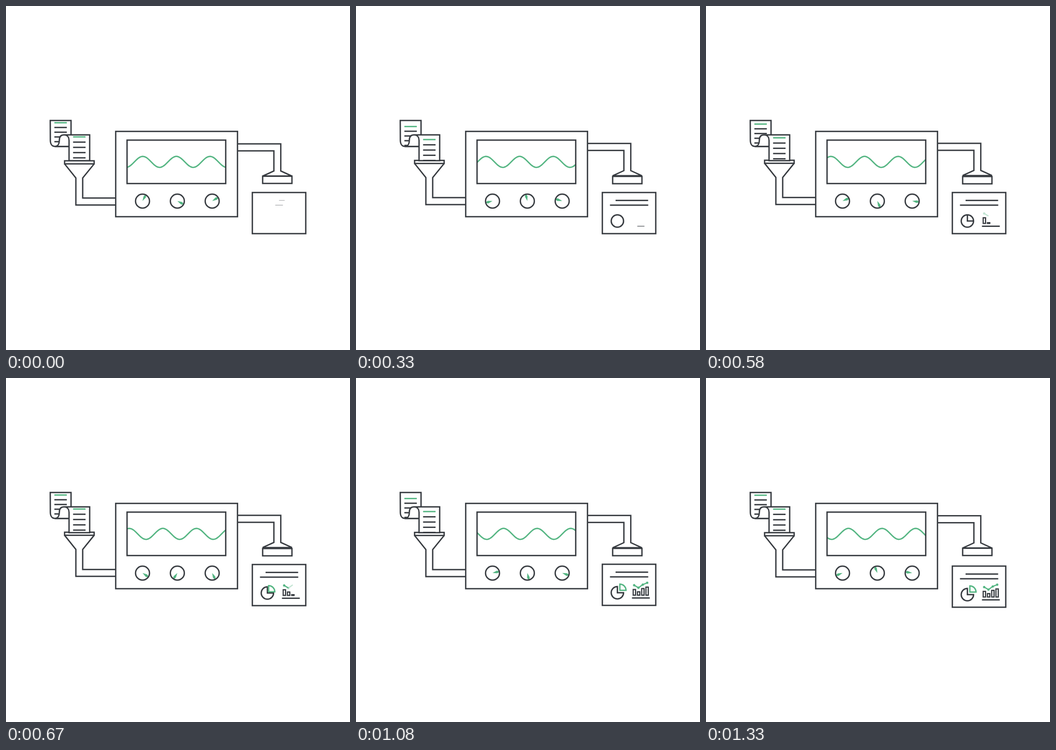
Recreate the animation shown at these times as an HTML page. Size 640 by 640 pixels, loop 1.41 s.

```html
<!DOCTYPE html>
<html lang="en">
<head>
<meta charset="utf-8">
<title>Report machine</title>
<style>
  html, body { margin: 0; width: 100%; height: 100%; overflow: hidden; background: #fff; }
  svg { display: block; width: 100%; height: 100%; }
  .ink { fill: none; stroke: #373b40; stroke-width: 2.5; }
  .paper { fill: #fff; }
  .green { stroke: #54b582; }
  .solid { fill: #54b582; stroke: none; }
</style>
</head>
<body>
<svg viewBox="0 0 640 640" class="ink">
  <defs>
    <clipPath id="glass"><rect x="225.2" y="249.5" width="183.6" height="80.8"/></clipPath>
    <clipPath id="sheet"><rect x="116" y="238" width="41" height="50.5"/></clipPath>
    <clipPath id="back"><rect x="82" y="212" width="40" height="50"/></clipPath>
  </defs>

  <g id="funnel">
    <path d="M109 293.7L130 320V370.2H204M164 293.7L142.7 320V357.3H204"/>
    <rect x="109" y="288" width="55" height="5.7"/>
  </g>

  <path class="paper" d="M82.3 213H121V261.2H91C85 261.2 82.5 256 82.5 250Z"/>
  <g clip-path="url(#back)"><g id="lines1"></g></g>
  <path class="paper" stroke="none" d="M155.7 287.8V239.8H108C102 239.8 99.2 244 99.2 250C99.2 257 96 261.2 91 261.2H117.3V287.8Z"/>
  <path d="M91 261.2C96 261.2 99.2 257 99.2 250C99.2 244 102 239.8 108 239.8H155.7V287.8H117.3V250C117.3 244 114 239.8 108 239.8M91 261.2H117.3"/>
  <g clip-path="url(#sheet)"><g id="lines2"></g></g>

  <path id="pipe" d="M431 256.5H511.2V307L532 316.5H477.5L498.4 307V269.5H431"/>
  <rect id="nozzle" x="477.5" y="316.5" width="54.5" height="13.6"/>

  <rect x="204.1" y="233.3" width="226.6" height="158.7"/>
  <g clip-path="url(#glass)"><path id="wave" class="green"/></g>
  <rect x="225.2" y="249.5" width="183.6" height="80.8"/>
  <g id="dials"></g>

  <g id="card">
    <rect x="458.3" y="347" width="99.4" height="76.5"/>
    <path id="rule1" d="M-30.3 0H30.3"/>
    <path id="rule2" d="M-35.6 0H35.6"/>
    <path id="base" d="M-16.6 0H16.6"/>
    <g id="whole">
      <circle r="11.5"/>
      <path id="cut" d="M0 -11.5V0H11.5"/>
    </g>
    <path id="rest" d="M486.3 388.5A11.5 11.5 0 1 0 497.8 400H486.3Z"/>
    <path id="slice" class="green" d="M0 0V-11.5A11.5 11.5 0 0 1 11.5 0Z"/>
    <g id="bars"></g>
    <g id="graph"></g>
  </g>
</svg>
<script>
const $ = id => document.getElementById(id);
const LOOP = 1410, STEP = 1000 / 12, END = 17.5;

function add(parent, tag, attrs) {
  const el = document.createElementNS('http://www.w3.org/2000/svg', tag);
  for (const name in attrs) el.setAttribute(name, attrs[name]);
  return parent.appendChild(el);
}

// 0 before start, rising to 1 over span
const ramp = (u, start, span) => Math.max(0, Math.min(1, (u - start) / span));
const backIn = p => p * p * (2.7 * p - 1.7);
const move = (el, x, y, extra = '') => el.setAttribute('transform', `translate(${x} ${y}) ${extra}`);
const show = (el, on) => el.setAttribute('visibility', on ? 'visible' : 'hidden');

function pop(id, x, y, s) {
  show($(id), s > 0);
  move($(id), x, y, `scale(${s})`);
}

function textLines(group, x, y, gap) {
  for (let i = 0; i < 5; i++)
    add(group, 'path', { d: `M${x} ${y + i * gap}h23.2`, class: i ? '' : 'green' });
}
textLines($('lines1'), 90, 217.2, 8.8);
textLines($('lines2'), 124.8, 243.4, 9.8);

let curve = '';
for (let x = 220; x < 480; x += 2) {
  const y = 290 - 10.2 * Math.cos((x - 317) / 62.5 * 2 * Math.PI);
  curve += (curve ? 'L' : 'M') + x + ' ' + y.toFixed(2);
}
$('wave').setAttribute('d', curve);

const dials = [-62, 28, -31].map((turn, i) => {
  const x = 254 + 64.8 * i;
  const hand = add($('dials'), 'path', { class: 'solid', d: 'M0 0L8 -2.3Q11.5 -2.5 12.5 0Q11.5 2.5 8 2.3Z' });
  add($('dials'), 'circle', { cx: x, cy: 363, r: 13 });
  return { hand, x, turn };
});

const bars = [10.5, 6.3, 12.3, 15].map((h, i) =>
  ({ h, el: add($('bars'), 'rect', { x: 515.7 + 7.9 * i, width: 4.4, 'stroke-width': 2.2 }) }));

const points = [[517.5, 386], [525.5, 390.7], [533.5, 384.9], [541.8, 381.5]];
const graph = points.map(([x, y], i) => {
  const g = add($('graph'), 'g', { class: 'green' });
  if (points[i + 1]) add(g, 'path', { d: `M${x} ${y}L${points[i + 1]}`, 'stroke-width': 2.2 });
  add(g, 'circle', { cx: x, cy: y, r: 2.2, class: 'solid' });
  return g;
});

function drawMachine(u) {
  const shake = 1.1 * Math.sin(Math.PI * u / END);
  const feed = 5.1 * Math.sin(2 * Math.PI * u / END) ** 2;
  move($('funnel'), 0, -shake);
  move($('pipe'), 0, -shake);
  move($('nozzle'), 0, shake * .7);
  move($('lines1'), 0, feed * 1.4);
  move($('lines2'), 0, feed);
  move($('wave'), -3.15 * u, 0);
  for (const { hand, x, turn } of dials) move(hand, x, 362.8, `rotate(${57 * u + turn})`);
}

function drawCard(u) {
  move($('card'), 0, 10 * backIn(ramp(u, 12.5, 5)));
  pop('rule1', 513.2, 361.7, ramp(u, -.35, 2));
  pop('rule2', 508.1, 370.5, ramp(u, -.4, 2));
  pop('base', 530, 409.7, ramp(u, 3.2, 2));

  const split = u >= 8, off = 4.6 * ramp(u, 7, 2);
  pop('whole', 486.3, 400, split ? 0 : ramp(u, 1.5, 2));
  $('cut').setAttribute('transform', `scale(${ramp(u, 4, 2)})`);
  show($('rest'), split);
  show($('slice'), split);
  move($('slice'), 486.3 + off, 400 - off);

  bars.forEach(({ el, h }, i) => {
    const now = 1.3 + (h - 1.3) * ramp(u, 6 + i, 1);
    show(el, u >= 6 + i);
    el.setAttribute('y', 404.5 - now);
    el.setAttribute('height', now);
  });
  graph.forEach((g, i) => g.setAttribute('opacity', ramp(u, 6.65 + i, 1)));
}

function frame() {
  const t = performance.now() % LOOP;
  const k = Math.min(16, Math.floor((t + 4) / STEP));
  const u = k < 13 ? k : k + .5; // the motion skips half a step here
  drawMachine(u);
  drawCard(u);
  requestAnimationFrame(frame);
}
frame();
</script>
</body>
</html>
```
